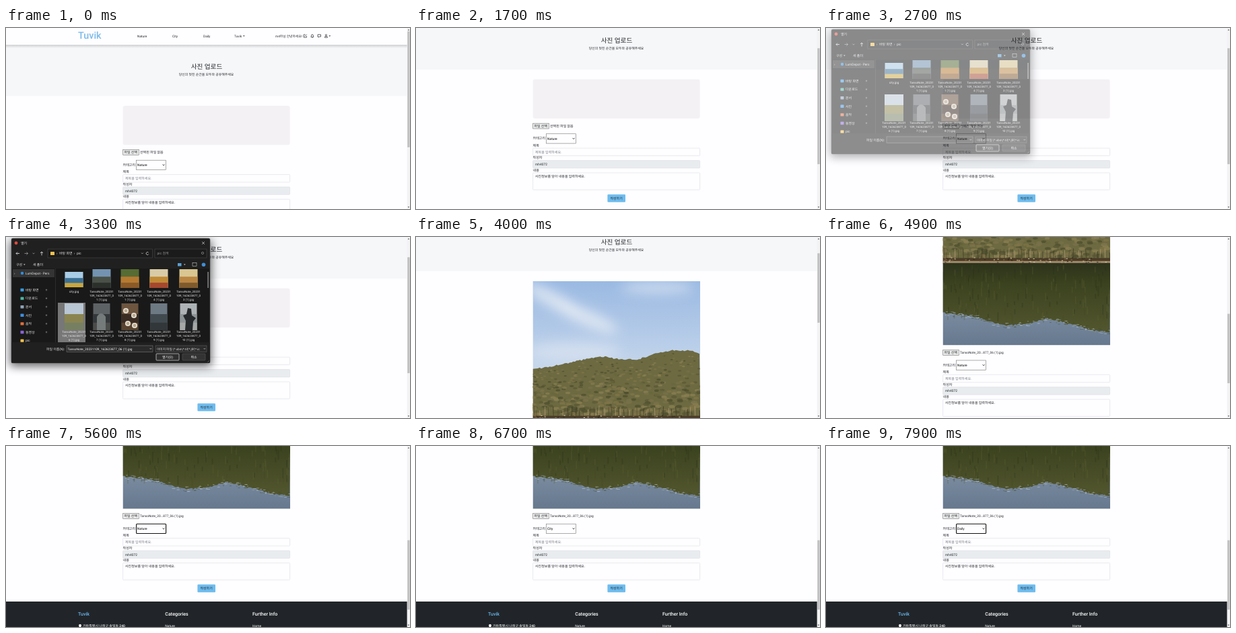
Recreate the animation shown at these times as an HTML page. Size 600 px wide and 270 px high, loop 8 s.

```html
<!DOCTYPE html>
<html>
<head>
<meta charset="utf-8">
<title>Photo upload</title>
<style>
  html, body { margin: 0; width: 100%; height: 100%; overflow: hidden; background: #fefdff; }
  svg { display: block; width: 100vw; height: 100vh; }
  text { font-family: Roboto, "Noto Sans CJK KR", "Noto Sans CJK", sans-serif; text-rendering: geometricPrecision; white-space: pre; }
</style>
</head>
<body>
<svg id="stage" viewBox="0 0 600 270"></svg>
<script>
const LOOP = 8000, PHOTO_H = 331, BOX_H = 58.5, INK = '#212529';
const BRAND = 'Tuvik', USER = 'mh4072', FILE = 'TansoNote_20231109_162623877_06 (1).jpg';

const rect = (x, y, w, h, fill, extra = '') =>
  `<rect x="${x}" y="${y}" width="${w}" height="${h}" fill="${fill}" ${extra}/>`;
const text = (x, y, s, size = 5, fill = INK, extra = '') =>
  `<text x="${x}" y="${y}" font-size="${size}" fill="${fill}" ${extra}>${s}</text>`;
const path = (d, fill, extra = '') => `<path d="${d}" fill="${fill}" ${extra}/>`;
const line = (d, color, width = 0.6) => path(d, 'none', `stroke="${color}" stroke-width="${width}"`);
const circle = (x, y, r, fill, extra = '') => `<circle cx="${x}" cy="${y}" r="${r}" fill="${fill}" ${extra}/>`;
const group = (id, body, extra = '') => `<g id="${id}" ${extra}>${body}</g>`;
const stroke = (color, width = 0.5) => `stroke="${color}" stroke-width="${width}"`;
const caret = (x, y, color = INK) => path(`M${x} ${y}h2.6l-1.3 1.5z`, color);
const gradient = (id, ...stops) => `<linearGradient id="${id}" x2="0" y2="1">` +
  stops.map(([at, color]) => `<stop offset="${at}" stop-color="${color}"/>`).join('') + '</linearGradient>';

function randomizer(seed) {
  return () => (seed = (seed * 16807) % 2147483647) / 2147483647;
}

// Height of a polyline at x
function along(points, x) {
  const i = Math.max(1, points.findIndex(p => p[0] >= x));
  const [[x0, y0], [x1, y1]] = [points[i - 1], points[i]];
  return y0 + (y1 - y0) * (x - x0) / (x1 - x0);
}

const defs = `<defs>
  ${gradient('sky', [0, '#9ab9e2'], [0.45, '#b9cee9'], [1, '#e2e8ef'])}
  ${gradient('water', [0, '#2c331b'], [0.3, '#3b421f'], [1, '#53572f'])}
  ${gradient('mirror', [0, '#97a4b7'], [0.5, '#7f90a5'], [1, '#66788d'])}
  ${gradient('shade', [0, '#000000'], [1, '#ffffff'])}
  <linearGradient id="drop" x2="0" y2="1"><stop offset="0" stop-color="#000" stop-opacity=".16"/><stop offset="1" stop-color="#000" stop-opacity="0"/></linearGradient>
  <filter id="soft" x="-50%" y="-50%" width="200%" height="200%"><feGaussianBlur stdDeviation="9"/></filter>
  <filter id="blur" x="-20%" y="-20%" width="140%" height="140%"><feGaussianBlur stdDeviation="7"/></filter>
  <clipPath id="frame">${rect(0, 0, 248.5, PHOTO_H, '#000')}</clipPath>
  <clipPath id="files">${rect(9, 47, 293, 110, '#000')}</clipPath>
</defs>`;

function photo() {
  const rnd = randomizer(77);
  const pick = list => list[Math.floor(rnd() * list.length)];
  const ridge = [[0, 132], [50, 123], [85, 115], [107, 113], [130, 117], [156, 117], [185, 107], [212, 103], [235, 104], [249, 108]];
  const edge = [[0, 283], [42, 287], [70, 296], [92, 302], [127, 299], [150, 292], [175, 296], [202, 303], [225, 309], [249, 311]];
  const outline = (points, jag) => {
    let d = '';
    for (let x = 0; x <= 249; x += 2.5) d += `L${x} ${(along(points, x) + (rnd() - 0.5) * jag).toFixed(1)}`;
    return d;
  };
  let out = rect(0, 0, 248.5, 210, 'url(#sky)');
  out += `<g filter="url(#soft)" fill="#e9eef5">
    <ellipse cx="30" cy="28" rx="48" ry="11" transform="rotate(28 30 28)" opacity=".8"/>
    <ellipse cx="80" cy="55" rx="50" ry="11" transform="rotate(24 80 55)" opacity=".8"/>
    <ellipse cx="185" cy="10" rx="55" ry="9" opacity=".6"/>
    <ellipse cx="60" cy="105" rx="70" ry="14" opacity=".5"/></g>`;
  out += path(`M0 210${outline(ridge, 2)}L249 210z`, '#6d6a41');

  const greens = ['#5a5935', '#78704a', '#4d4e2e', '#8b7f53', '#69673d', '#807448'];
  for (let i = 0; i < 620; i++) {
    const depth = i / 620, x = rnd() * 249, top = along(ridge, x) + 2;
    const y = top + (199 - top) * Math.min(1, depth + rnd() * 0.08), r = 1.6 + depth * 3.6;
    out += `<ellipse cx="${x.toFixed(1)}" cy="${y.toFixed(1)}" rx="${r.toFixed(1)}" ry="${(r * 0.5).toFixed(1)}" fill="${pick(greens)}" opacity=".75"/>`;
  }
  for (let x = 2; x < 249; x += 3 + rnd() * 5)
    out += line(`M${x.toFixed(1)} ${(186 + rnd() * 8).toFixed(1)}l${(rnd() * 2 - 1).toFixed(1)} 14`, pick(['#3c3323', '#b3a07a', '#54482f']), 0.7);
  out += rect(0, 201, 248.5, 5, '#4a3c28') + rect(0, 205.5, 248.5, 3.2, '#a68a66');
  for (let i = 0; i < 90; i++)
    out += rect((rnd() * 248).toFixed(1), (200 + rnd() * 8).toFixed(1), 2.2, 1, pick(['#d9c7a8', '#30281c', '#8d7350']));

  out += rect(0, 208.5, 248.5, 123, 'url(#mirror)');
  out += path(`M0 208.5${outline(edge, 2.6)}L249 208.5z`, 'url(#water)');
  for (let i = 0; i < 170; i++) {
    const x = rnd() * 248, y = 211 + rnd() * 76;
    out += rect(x.toFixed(1), y.toFixed(1), 1.8, (4 + rnd() * 12).toFixed(1), pick(['#283018', '#5d6034', '#464b26']), 'opacity=".3"');
  }
  for (let i = 0; i < 150; i++) {
    const x = rnd() * 248, y = along(edge, x) + (rnd() - 0.5) * 8;
    out += rect(x.toFixed(1), y.toFixed(1), (1 + rnd() * 4).toFixed(1), 0.6, pick(['#a9b5c5', '#3f4729', '#d3dae3']), 'opacity=".7"');
  }
  return group('photo', `<g clip-path="url(#frame)">${out}</g>`, 'transform="translate(173.5 116)"');
}

function header() {
  const icon = d => line(d, INK, 0.7);
  return rect(0, 25, 600, 5, 'url(#drop)') + rect(0, 0, 600, 25, '#fefdff') +
    text(107, 15.5, BRAND, 14.4, '#7dbbea', 'font-weight="500"') +
    [['Nature', 195], ['City', 247], ['Daily', 293], [BRAND, 339]].map(([s, x]) => text(x, 13.5, s, 4.8)).join('') +
    caret(352, 11.2) + text(400, 13.5, 'm4하님 안녕하세요!', 4.75) +
    icon('M444.5 9.8h-2.3v4.2h4.2v-2M443.8 12.6l2.8-3') +
    icon('M452.8 13.3h4.2q-.7-.7-.7-2.2q0-1.4-1.4-1.4t-1.4 1.4q0 1.5-.7 2.2M454.2 14.3h1.4') +
    icon('M463 9.8h4.4v3.2h-2.6l-1 1v-1h-.8z') +
    icon('M473.3 14.2q0-2 2.1-2t2.1 2z') + circle(475.4, 10.6, 1.1, 'none', stroke(INK, 0.7)) + caret(479.5, 11.2);
}

function form() {
  const field = (y, h, fill = '#fefdff') => rect(173.6, y, 248, h, fill, 'rx="1" ' + stroke('#d5d9de'));
  return rect(173.7, 181.6, 23.6, 7.9, '#ececec', stroke('#737373', 0.6)) + text(175.4, 187.3, '파일 선택') +
    text(199, 187.3, '선택된 파일 없음', 5, INK, 'id="fileName"') +
    text(173.6, 205.9, '카테고리') +
    rect(193.6, 197.2, 44, 14.3, '#fefdff', 'id="select" ' + stroke('#767676', 0.6)) +
    text(195, 206.1, 'Nature', 4.9, '#000', 'id="category"') + line('M232.6 203.5l1.5 1.6 1.5-1.6', '#111', 0.8) +
    text(173.6, 216.4, '제목') + field(218.6, 11.4) + text(177, 226.2, '제목을 입력하세요.', 5, '#7a8087') +
    text(173.6, 234.9, '작성자') + field(237, 11.4, '#e9ecef') + text(177, 244.5, USER, 4.9) +
    text(173.6, 253.2, '내용') + field(255.4, 25.4) + text(177, 262.2, '사진정보를 담아 내용을 입력하세요.') +
    rect(284.4, 287.6, 26.6, 11.6, '#6ebcee', 'rx="1.2"') + text(288.4, 295.2, '작성하기');
}

function footer() {
  const head = (x, s, color) => text(x, 334, s, 7.1, color, 'font-weight="500"');
  return rect(0, 313, 600, 100, INK) +
    head(107, BRAND, '#6cb8ee') + head(236.3, 'Categories', '#fff') + head(366, 'Further Info', '#fff') +
    path('M110 352.3q-2-2.3-2-3.5a2 2 0 0 1 4 0q0 1.2-2 3.5z', '#fff') +
    text(114, 351.4, '가람특별시 나래구 솔빛동 240', 5, '#fff', 'font-weight="500"') +
    text(236.3, 351.4, 'Nature', 4.9, '#fff') + text(366, 351.4, 'Home', 4.9, '#fff');
}

function thumbnail(x, y, w, h, [top, mid, low]) {
  return rect(x, y, w, h, top) + rect(x, y + h * 0.4, w, h * 0.6, mid) + rect(x, y + h * 0.72, w, h * 0.28, low);
}

function dialog() {
  const pale = '#e8e8e8', dim = '#9a9a9a', base = '#202020';
  const centers = [101, 142, 184, 227, 271];
  const caption = (x, y, id) => ['TansoNote_20231', '109_162623877_0', `${id} (1).jpg`]
    .map((s, i) => text(x, y + i * 6, s, 4.4, pale, 'text-anchor="middle"')).join('');
  const upper = [
    ['#a9cce6', '#3c6f93', '#c9a640'], ['#7393b0', '#4a5147', '#2c302b'], ['#566c33', '#b57a32', '#8a5a28'],
    ['#d8cba6', '#c08a36', '#a4482f'], ['#d9c690', '#b98643', '#7f5a2d']];
  const lower = [
    ['#b9c6d3', '#8a8550', '#777f63'], ['#5d6265', '#34383a', '#4b4d4b'], ['#6d5540', '#3a2c22', '#57432f'],
    ['#6d7a84', '#414a4f', '#323739'], ['#aeb4b6', '#8d9496', '#a5a8a7']];
  const places = ['바탕 화면', '다운로드', '문서', '사진', '음악', '동영상', 'pic'];
  const tints = ['#3a9be0', '#4db6a0', '#8ea4b8', '#3d8fe0', '#e0703c', '#8a63d8', '#f2c14e'];

  const chrome = rect(8, 2, 295, 186, base, 'rx="2" ' + stroke('#4a4a4a')) +
    circle(15, 9, 2.4, '#dd4b3e') + text(22, 11, '열기', 5, pale) + line('M291 7l4 4m0-4l-4 4', pale) +
    line('M20 24.5h-5m2-2l-2 2 2 2M53 27.5v-5.5m-2 2l2-2 2 2', pale, 0.8) +
    line('M27.5 24.5h5m-2-2l2 2-2 2M39.5 23.7l1.5 1.5 1.5-1.5', dim, 0.8) +
    rect(62, 18, 155.5, 13, '#1b1b1b', stroke('#505050')) + rect(66, 22, 6, 5, '#f2c14e', 'rx=".6"') +
    text(75, 26.4, '›  바탕 화면  ›  pic', 5, pale) + line('M201 23.6l1.4 1.4 1.4-1.4', pale) +
    line('M211.5 23.2a2 2 0 1 0 .4 2.2', pale, 0.7) +
    rect(221, 18, 77, 13, '#1b1b1b', stroke('#505050')) + text(224.5, 26.4, 'pic 검색', 5, dim) +
    circle(292, 24, 1.6, 'none', stroke(dim, 0.7)) +
    text(15, 43, '구성', 5, pale) + caret(26, 40.4, pale) + text(40, 43, '새 폴더', 5, pale) +
    rect(255, 39, 5.5, 4.5, '#5b9fd3') + caret(264, 40.4, pale) +
    rect(277, 38.6, 6, 5, 'none', stroke(pale)) + circle(293.5, 41.2, 2.8, '#3f8fd8');

  const sidebar = rect(9, 47, 293, 110, '#191919') + rect(10, 48, 62, 12, '#343434') +
    text(12, 55.8, '›', 5, pale) + circle(24, 54, 2.2, '#2f8fdd') + text(29, 55.8, 'LumDepot - Pers', 4.8, pale) +
    places.map((s, i) => {
      const y = 79 + i * 12.6;
      return rect(21.5, y - 2.2, 5, 4.4, tints[i], 'rx=".6"') + text(29, y + 1.8, s, 5, pale) +
        (i < 6 ? line(`M60 ${y - 1.4}v2.8m-1.2-1.6h2.4`, dim) : '');
    }).join('') + rect(73, 47, 0.6, 110, '#3a3a3a') + rect(299.4, 52, 1.4, 24, '#8f8f8f');

  const files = rect(77, 98, 41, 59, '#777777', 'id="picked"') +
    centers.map((x, i) =>
      thumbnail(x - 13.5, i ? 48 : 52, 27, i ? 28 : 23, upper[i]) +
      (i ? caption(x, 82.5, [0, 0, 1, 4, 3][i] || 1) : text(x, 82.5, 'city.jpg', 4.6, pale, 'text-anchor="middle"')) +
      thumbnail(x - (i ? 12.5 : 14), 99, i ? 25 : 28, 40, lower[i]) +
      caption(x, 142.5, 6 + i)).join('') +
    [[178, 110], [190, 117], [181, 129], [191, 132]].map(([x, y]) => circle(x, y, 4, '#e8e2d6') + circle(x, y, 2.4, '#b8a78d')).join('') +
    path('M266 139l1-14-4-8 5-2 2-9 5 1 1 10 6 4-4 5-1 13z', '#26292b') +
    path('M135 139v-20q6-10 13 0v20z', '#757a7b');

  const bottom = rect(8.3, 157, 294.4, 30.6, base) +
    text(60, 169, '파일 이름(N):', 4.9, pale) + rect(90, 162, 128, 9.6, '#2b2b2b', stroke('#858585')) +
    text(91.5, 168.9, FILE, 4.8, '#fff', 'id="chosen"') + line('M213.5 166l1.3 1.3 1.3-1.3', pale) +
    rect(222, 162, 76, 9.6, '#2b2b2b', stroke('#6a6a6a')) + text(224, 168.9, '이미지 파일 (*.xbm;*.tif;*.jfif;*.ic', 4.7, pale) +
    line('M293.5 166l1.3 1.3 1.3-1.3', pale) +
    rect(223, 174, 34, 10, '#2f2f2f', 'rx="1" ' + stroke('#dcdcdc', 0.7)) + text(240, 180.9, '열기(O)', 5, '#fff', 'text-anchor="middle"') +
    rect(262, 174, 34, 10, '#333333', 'rx="1" ' + stroke('#606060')) + text(279, 180.9, '취소', 5, '#fff', 'text-anchor="middle"') +
    line('M299.5 186.5l2-2', dim);

  return group('dialog', rect(6, 5, 299, 188, '#000', 'opacity=".6" filter="url(#blur)"') +
    chrome + `<g clip-path="url(#files)">${sidebar}${files}</g>` + bottom);
}

document.getElementById('stage').innerHTML = defs + rect(0, 0, 600, 270, '#fefdff') +
  group('page',
    rect(0, 25, 600, 76.4, '#f6f7f9') + header() +
    text(298, 61.3, '사진 업로드', 9.6, INK, 'text-anchor="middle"') +
    text(297.5, 71.2, '당신의 멋진 순간을 모두와 공유해주세요', 4.9, INK, 'text-anchor="middle"') +
    rect(173.6, 116, 248, BOX_H, '#f3f1f4', 'id="empty" rx="3"') + photo() +
    group('lower', form() + footer())) +
  rect(595.6, 0, 4.4, 270, '#f3f3f4') + rect(596.2, 5, 3.4, 173, '#c1c1c2', 'id="thumb"') +
  path('M596.6 3.4h2.6l-1.3-1.6zM596.6 266.6h2.6l-1.3 1.6z', '#555') + dialog();

const $ = id => document.getElementById(id);
const show = (id, on) => $(id).setAttribute('visibility', on ? 'inherit' : 'hidden');
const smooth = p => p * p * (3 - 2 * p);
const slowing = p => 1 - (1 - p) ** 2;

// [start, end, distance, easing]
const scrolls = [
  [930, 1400, 39.4, smooth],
  [3930, 4400, 177.6, smooth],
  [4650, 5500, 136.5, slowing],
];
const scrollAt = t => scrolls.reduce((sum, [from, to, dist, ease]) =>
  sum + dist * ease(Math.min(1, Math.max(0, (t - from) / (to - from)))), 0);

function draw(t) {
  const loaded = t >= 3600, scroll = scrollAt(t);
  const pageHeight = loaded ? 678 : 406, track = 260;
  $('page').setAttribute('transform', `translate(0 ${-scroll})`);
  $('lower').setAttribute('transform', `translate(0 ${loaded ? PHOTO_H - BOX_H : 0})`);
  show('photo', loaded);
  show('empty', !loaded);
  $('fileName').textContent = loaded ? 'TansoNote_20...877_06 (1).jpg' : '선택된 파일 없음';
  $('fileName').setAttribute('font-size', loaded ? 4.75 : 5);
  $('thumb').setAttribute('y', 5 + scroll * track / pageHeight);
  $('thumb').setAttribute('height', 270 * track / pageHeight);

  const picked = t >= 3100;
  show('dialog', t >= 2700 && t < 3500);
  $('dialog').setAttribute('opacity', Math.min(1, 0.5 + (t - 2700) / 300));
  show('picked', picked);
  show('chosen', picked);

  const focused = (t >= 5600 && t < 6500) || t >= 6800;
  $('category').textContent = t < 6500 ? 'Nature' : t < 7300 ? 'City' : 'Daily';
  $('select').setAttribute('stroke', focused ? '#101010' : '#767676');
  $('select').setAttribute('stroke-width', focused ? 1.1 : 0.6);
  $('select').setAttribute('rx', focused ? 1 : 0);
}

function tick() {
  draw(performance.now() % LOOP);
  requestAnimationFrame(tick);
}
tick();
</script>
</body>
</html>
```
